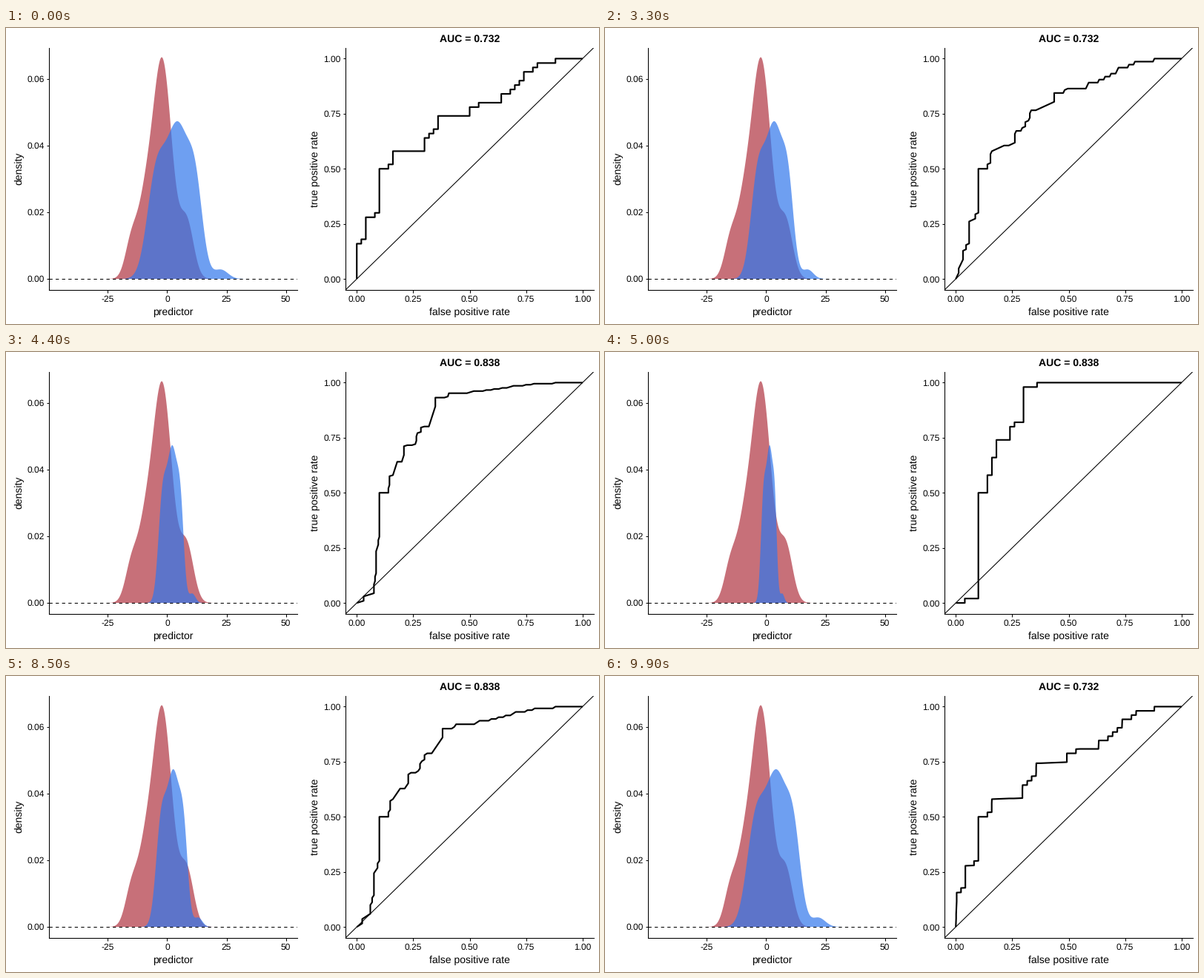
A matplotlib script for the animation above (10 s loop, 800 by 400 pixels).

```python
import numpy as np
import matplotlib.pyplot as plt
from matplotlib.animation import FuncAnimation
from matplotlib.patches import Polygon

W, H = 800, 400
PX = 0.72  # points per pixel at 100 dpi
FRAMES, INTERVAL = 100, 100
HOLD, MOVE = 25, 25
TOP, BASE = 26.5, 354
THIN, BOLD = 1.07 * PX, 2.13 * PX

plt.rcParams.update({"font.family": "Liberation Sans", "text.hinting": "none"})
fig = plt.figure(figsize=(W / 100, H / 100), dpi=100, facecolor="white")


def label(x, y, text, size=14, **kw):
    """Text with its baseline at pixel (x, y), y counted from the top."""
    kw = {"ha": "center", "va": "baseline", **kw}
    return fig.text(x / W, 1 - y / H, text, fontsize=size * PX, **kw)


def panel(left, right, xlim, ylim, xticks, yticks, xname, yname, xfmt, name_x):
    ax = fig.add_axes([left / W, 1 - BASE / H, (right - left) / W, (BASE - TOP) / H])
    ax.set(xlim=xlim, ylim=ylim, xticks=xticks, yticks=yticks, facecolor="none")
    ax.tick_params(length=3.5 * PX, width=THIN, labelleft=False, labelbottom=False)
    ax.spines[["top", "right"]].set_visible(False)
    ax.spines[["left", "bottom"]].set_linewidth(THIN)
    for v in xticks:
        px = left + (v - xlim[0]) / (xlim[1] - xlim[0]) * (right - left)
        label(px, 369.5, format(v, xfmt), 12)
    for v in yticks:
        py = BASE - (v - ylim[0]) / (ylim[1] - ylim[0]) * (BASE - TOP)
        label(left - 6.5, py + 4.3, f"{v:.2f}", 12, ha="right")
    label((left + right) / 2, 388.5, xname)
    label(name_x, (TOP + BASE) / 2, yname, rotation=90, ha="right", va="center")
    return ax


def density(*humps):
    """Outline of a sum of normal curves given as (weight, mean, sd)."""
    x = np.linspace(-26, 34, 400)
    y = sum(w * np.exp(-((x - m) / s) ** 2 / 2) / (s * np.sqrt(2 * np.pi))
            for w, m, s in humps)
    return np.column_stack([x, y])


def roc(*corners):
    """Staircase of 50 + 50 moves through the corners; near-diagonal legs zigzag."""
    moves, x, y = "", 0, 0
    for col, row in [*corners, (50, 50)]:
        run, rise = col - x, row - y
        if run < rise < 2 * run:
            moves += "RU" * run + "U" * (rise - run)
        else:
            moves += "R" * run + "U" * rise
        x, y = col, row
    steps = [(0, 0)] + [(m == "R", m == "U") for m in moves]
    return np.cumsum(steps, axis=0) / 50


red = density((0.672, -2.1, 4.1), (0.142, -9.7, 3.2), (0.067, -15.2, 2.6),
              (0.119, 8.3, 2.9))
blue = density((0.587, 4.4, 5.15), (0.247, -5, 3.75), (0.146, 12.1, 3),
               (0.02, 22.7, 2.95))
wide = roc((0, 8), (1, 9), (2, 14), (4, 15), (5, 25), (7, 26), (8, 29), (15, 32),
           (18, 37), (25, 39), (27, 40), (32, 42), (34, 43), (37, 47), (39, 48),
           (40, 49), (44, 50))
narrow = roc((2, 1), (5, 25), (7, 29), (8, 33), (9, 37), (12, 40), (13, 41),
             (15, 49), (18, 50))

left_ax = panel(58, 393, (-49.84, 54.84), (-0.00333, 0.06944),
                np.arange(-25, 51, 25), np.arange(4) * 0.02,
                "predictor", "density", "d", 24)
quarters = np.linspace(0, 1, 5)
right_ax = panel(458, 793, (-0.05, 1.05), (-0.05, 1.05), quarters, quarters,
                 "false positive rate", "true positive rate", ".2f", 424.5)

left_ax.axhline(0, color="black", lw=THIN, ls=(0, (4, 4)), zorder=0)
left_ax.add_patch(Polygon(red, fc="#B03341", alpha=0.7, lw=0, zorder=1))
moving = left_ax.add_patch(Polygon(blue, fc="#3077EC", alpha=0.7, lw=0, zorder=2))
right_ax.plot([-0.05, 1.05], [-0.05, 1.05], color="black", lw=THIN)
curve, = right_ax.plot([], [], color="black", lw=BOLD, snap=False,
                       solid_joinstyle="round", solid_capstyle="butt")
title = label(625.7, 19, "", weight="bold")


def progress(frame):
    """0 for the wide spread, 1 for the narrow one."""
    half, k = divmod(frame, HOLD + MOVE)
    p = max(0, k - HOLD) / MOVE
    return 1 - p if half else p


def update(frame):
    p = progress(frame)
    moving.set_xy(blue * [1 - 0.71 * p, 1] + [0.2 * p, 0])
    curve.set_data(*((1 - p) * wide + p * narrow).T)
    title.set_text("AUC = 0.838" if p > 0.5 else "AUC = 0.732")
    return moving, curve, title


anim = FuncAnimation(fig, update, frames=FRAMES, interval=INTERVAL,
                     repeat=True, repeat_delay=0)
plt.show()
```
